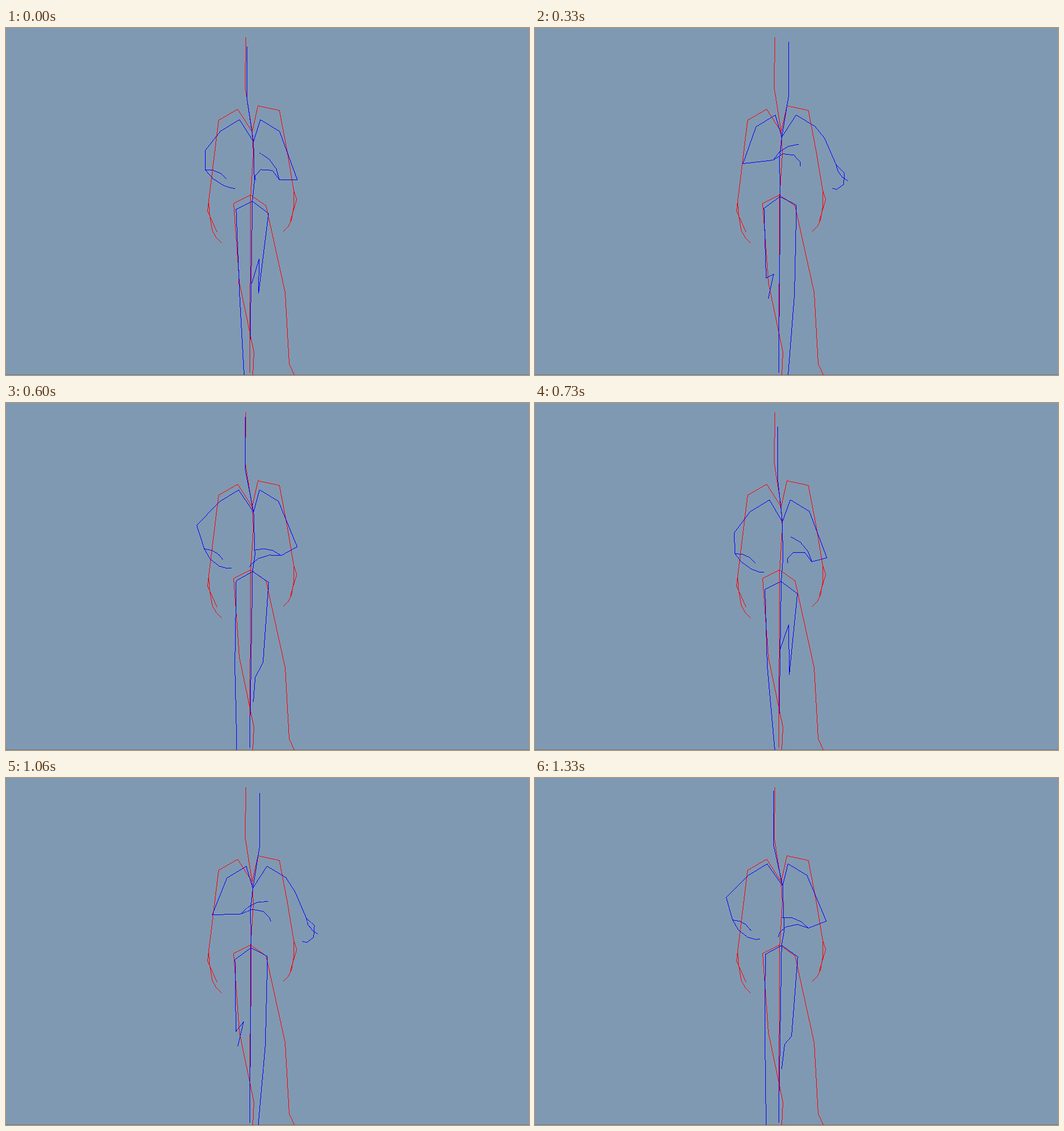
These frames come from a looping animation (904x600 px, 1.39 s). An HTML page with a canvas:

```html
<!DOCTYPE html>
<html lang="en">
<head>
<meta charset="utf-8">
<title>Running skeleton</title>
<style>
  html, body { margin: 0; width: 100%; height: 100%; overflow: hidden; background: #8099b2; }
  canvas { display: block; width: 904px; height: 600px; image-rendering: pixelated; }
</style>
</head>
<body>
<canvas id="stage" width="904" height="600"></canvas>
<script>
const ctx = document.getElementById('stage').getContext('2d');
const LOOP = 1390, STEP = 66.3;
const RED = '#f00', BLUE = '#00f';
const ROOT = [420.6, 595], HIPS = [422.4, 288];

// The standing figure never moves
const standing = [
  [[414, 16], [413, 103], [425, 179], [427, 217], HIPS, ROOT],
  [[425, 179], [400, 140], [367, 159], [350, 298], [348, 316], [364, 352]],
  [[350, 298], [351, 320], [356, 350], [363, 362], [372, 371]],
  [[425, 179], [435, 134], [472, 142], [485, 210], [497, 281], [502, 296], [491, 333]],
  [[497, 281], [497, 308], [493, 331], [487, 343], [479, 351]],
  [[426, 600], [428, 560], [403, 440], [393, 303], HIPS, [449, 307], [482, 457], [489, 580], [498, 600]]
];

// Runner: chest height, head lean, arms (elbow, wrist, hand angle), legs (knee, ankle)
const pose = (chest, lean, ...limbs) => [chest, lean, ...limbs.flat()];
const reach = pose(196, -11, [344, 211, 344, 245, 146], [503, 262, 472, 262, 184], [403, 455, 411, 600], [436, 458, 437, 399]);
const land  = pose(205,  -8, [344, 224, 345, 260, 145], [504, 267, 478, 274, 182], [401, 455, 414, 600], [439, 469, 438, 383]);
const push  = pose(195,   7, [354, 245, 400, 256, 163], [507, 201, 522, 265, 134], [398, 437, 418, 500], [453, 455, 449, 530]);
const fly   = pose(188,  12, [359, 234, 411, 228, 173], [500, 190, 520, 236,  94], [399, 432, 412, 425], [448, 460, 437, 600]);
const sink  = pose(214,   9, [332, 268, 362, 317, 144], [501, 265, 510, 306, 119], [381, 488, 400, 409], [449, 480, 428, 568]);
const rise  = pose(212,   5, [325, 259, 354, 307, 133], [499, 272, 501, 305, 124], [378, 492, 396, 439], [448, 480, 428, 547]);
const float = pose(186, -16, [330, 206, 341, 245, 142], [503, 247, 472, 259, 168], [397, 450, 399, 600], [443, 446, 431, 460]);

const split = p => [p.slice(2, 7), p.slice(7, 12), p.slice(12, 16), p.slice(16)];

function mirror(p) {
  const flip = ([x1, y1, x2, y2, ...hand]) => [848 - x1, y1, 848 - x2, y2, ...hand];
  const [armL, armR, legL, legR] = split(p);
  return pose(p[0], -p[1], flip(armR), flip(armL), flip(legR), flip(legL));
}

// Two strides: [step, pose]
const keys = [
  [0, reach], [1.75, mirror(sink)], [3.3, push], [5, fly], [7, sink], [9.3, float],
  [11, land], [12.6, mirror(sink)], [14, push], [15.7, fly], [18, rise], [20, float], [21.4, reach]
];

// Smooth curve through the keys
function poseAt(s) {
  let k = 0;
  while (k < keys.length - 2 && keys[k + 1][0] <= s) k++;
  const key = i => keys[Math.max(0, Math.min(keys.length - 1, i))];
  const [t0, a] = key(k - 1), [t1, b] = key(k), [t2, c] = key(k + 1), [t3, d] = key(k + 2);
  const span = t2 - t1, u = (s - t1) / span, u2 = u * u, u3 = u2 * u;
  return b.map((v, i) => {
    const m1 = (c[i] - a[i]) / (t2 - t0) * span;
    const m2 = (d[i] - v) / (t3 - t1) * span;
    return (2 * u3 - 3 * u2 + 1) * v + (u3 - 2 * u2 + u) * m1
         + (3 * u2 - 2 * u3) * c[i] + (u3 - u2) * m2;
  });
}

// Hard-edged line, one pixel wide
function line([x0, y0], [x1, y1]) {
  const n = Math.max(1, Math.round(Math.max(Math.abs(x1 - x0), Math.abs(y1 - y0))));
  for (let i = 0; i <= n; i++) {
    ctx.fillRect(Math.round(x0 + (x1 - x0) * i / n), Math.round(y0 + (y1 - y0) * i / n), 1, 1);
  }
}

function chain(...pts) {
  for (let i = 1; i < pts.length; i++) line(pts[i - 1], pts[i]);
}

// Bones laid end to end, each turned a little further
function curl([x, y], side, angle, turn, bones) {
  const pts = [[x, y]];
  for (const len of bones) {
    const r = angle * Math.PI / 180;
    pts.push([x += side * len * Math.cos(r), y += len * Math.sin(r)]);
    angle += turn;
  }
  chain(...pts);
}

// Fingers uncurl as the hand rises; the thumb swings twice as far
function hand(wrist, side, angle) {
  const bend = Math.max(-50, Math.min(50, (153 - angle) * 2));
  const thumb = (25 + Math.abs(angle - 115) / 2) / 3;
  curl(wrist, side, angle - bend, bend, [20, 20, 15, 7]);
  curl(wrist, side, 2 * angle - 114, -20, [thumb, thumb, thumb]);
}

function runner(p) {
  const [y, lean] = p, [armL, armR, legL, legR] = split(p);
  const x = 426.7 - lean * 0.05, twist = lean * 0.55;
  const chest = [x, y], hips = [424.4 - lean * 0.08, y + 103];
  const tilt = (legR[3] - legL[3]) / 60;

  const arm = (side, [ex, ey, wx, wy, angle]) => {
    chain(chest, [x + side * 18 + twist, y - 38], [x + side * 51 + twist, y - 18], [ex, ey], [wx, wy]);
    hand([wx, wy], side, angle);
  };
  const leg = (side, [kx, ky, ax, ay]) => {
    const hip = [hips[0] + side * 28, hips[1] + 17.5 - side * tilt];
    const toe = [ax + Math.min(0, (ay - 500) / 8), ay + 42];
    chain(hips, hip, [kx, ky], [ax, ay], toe);
  };

  ctx.fillStyle = BLUE;
  chain([x + lean, y - 164], [x + lean, y - 72], chest, [425.5 - lean * 0.3, y + 55 - lean * 1.4], hips, ROOT);
  arm(-1, armL);
  arm(1, armR);
  leg(-1, legL);
  leg(1, legR);

  // With low hips the standing root line lies in front
  if (hips[1] > 298.5) {
    ctx.fillStyle = RED;
    line(HIPS, ROOT);
  }
}

function draw(step) {
  ctx.fillStyle = '#8099b2';
  ctx.fillRect(0, 0, 904, 600);
  ctx.fillStyle = '#667a8e';
  ctx.fillRect(0, 599, 904, 1);
  ctx.fillStyle = RED;
  for (const path of standing) chain(...path);
  runner(poseAt(step));
}

let shown = -1;
function tick() {
  const t = performance.now() % LOOP;
  const step = Math.ceil((Math.floor(t / 10) * 10 + 6) / STEP) - 1;
  if (step !== shown) draw(shown = step);
  requestAnimationFrame(tick);
}
tick();
</script>
</body>
</html>
```
